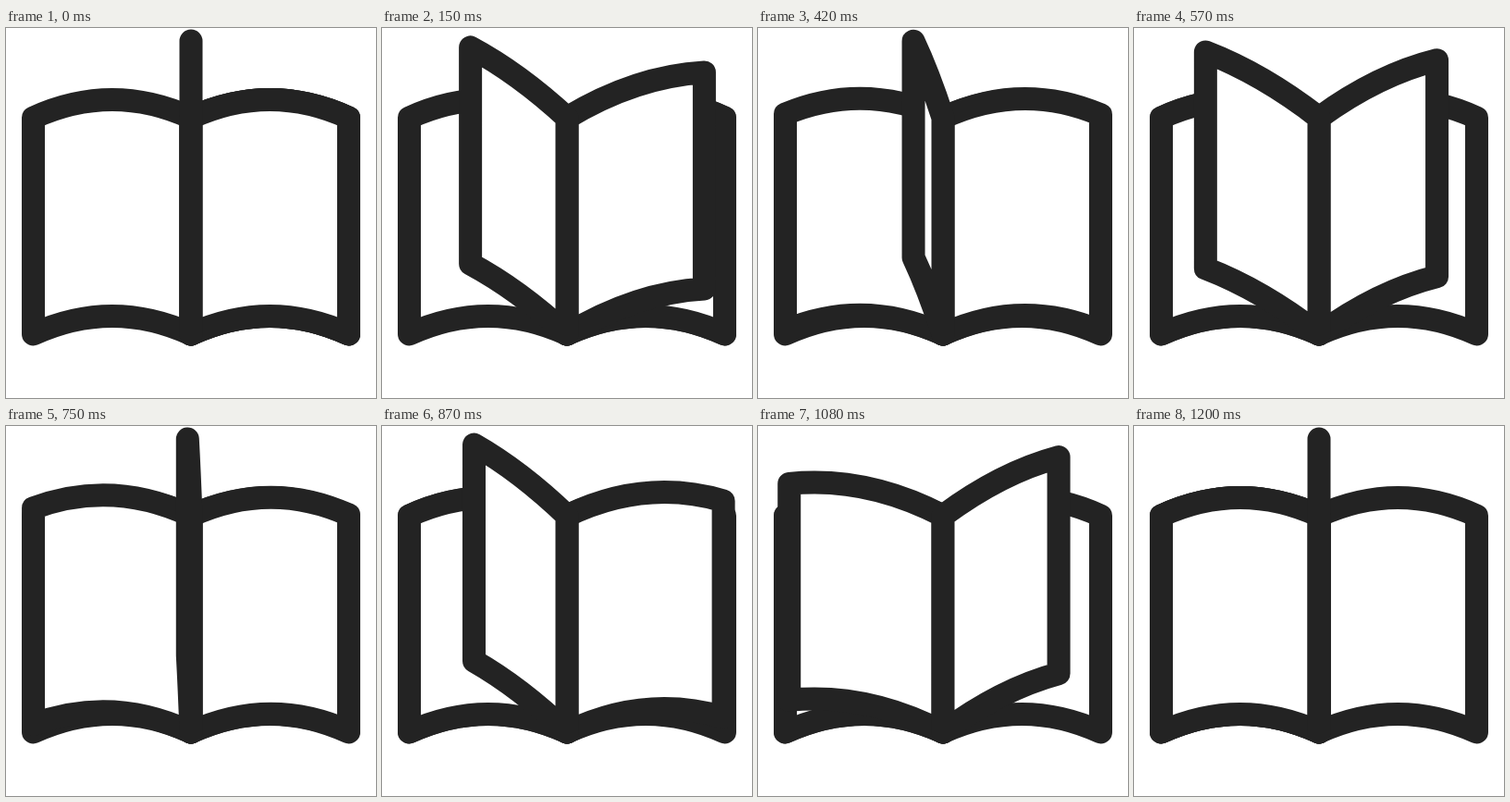
Write an HTML page that moves like this. It is 400 by 400 pixels and loops after 1.23 s.

```html
<!DOCTYPE html>
<html>
<head>
<meta charset="utf-8">
<style>
  html, body { margin: 0; height: 100%; overflow: hidden; background: #fff; }
  svg { display: block; width: 100vw; height: 100vh; }
  path { fill: #fff; stroke: #232323; stroke-width: 25; stroke-linejoin: round; }
</style>
</head>
<body>
<svg viewBox="0 0 400 400"><path/><path/><path/><path/><path/></svg>
<script>
const STEP = 30, LOOP = 1230;
const SPINE = 200, TOP = 97, HEIGHT = 234, WIDTH = 170.5, LIFT = 83;
const paths = [...document.querySelectorAll('path')];

// Turning angle of each page as [step, radians]: 0 lies right, PI lies left.
const turns = [
  [[0, Math.PI / 2], [8, 2.37], [14, 3.131], [16, Math.PI], [24, Math.PI], [24, 0],
   [25, 0.005], [29, 0.14], [33, 0.491], [36, 0.81], [40, Math.PI / 2]],
  [[0, 0], [2, 0.05], [4, 0.36], [8, 1.164], [14, 1.652], [19, 2.227], [25, 3.11], [27, Math.PI]],
  [[12, 0], [14, 0.02], [16, 0.26], [19, 0.787], [25, 1.574], [33, 2.507], [38, 3.11], [40, Math.PI]]
];

function angleAt(keys, step) {
  if (step <= keys[0][0]) return keys[0][1];
  for (let i = 1; i < keys.length; i++) {
    const [s0, a0] = keys[i - 1], [s1, a1] = keys[i];
    if (step < s1) return a0 + (a1 - a0) * (step - s0) / (s1 - s0);
  }
  return keys[keys.length - 1][1];
}

// The free edge follows a superellipse, squarer on the left side.
function edgeAt(angle) {
  const c = Math.cos(angle), power = c > 0 ? 2 / 2.4 : 2 / 3;
  return {
    dx: Math.sign(c) * WIDTH * Math.abs(c) ** power,
    rise: LIFT * Math.max(0, Math.sin(angle)) ** power
  };
}

function pagePath({ dx, rise }) {
  const x = SPINE + dx, y = TOP - rise;
  const cx = SPINE + dx / 2, cy = TOP - 39 - rise * 0.12;
  return `M${SPINE} ${TOP}Q${cx} ${cy} ${x} ${y}V${y + HEIGHT}` +
    `Q${cx} ${cy + HEIGHT} ${SPINE} ${TOP + HEIGHT}Z`;
}

function draw(now) {
  const step = Math.floor(now % LOOP / STEP);
  const pages = turns.map(keys => edgeAt(angleAt(keys, step)))
    .sort((a, b) => Math.abs(b.dx) - Math.abs(a.dx));
  [edgeAt(0), edgeAt(Math.PI), ...pages]
    .forEach((edge, i) => paths[i].setAttribute('d', pagePath(edge)));
}

const start = performance.now();
function tick() {
  draw(performance.now() - start);
  requestAnimationFrame(tick);
}
tick();
</script>
</body>
</html>
```
